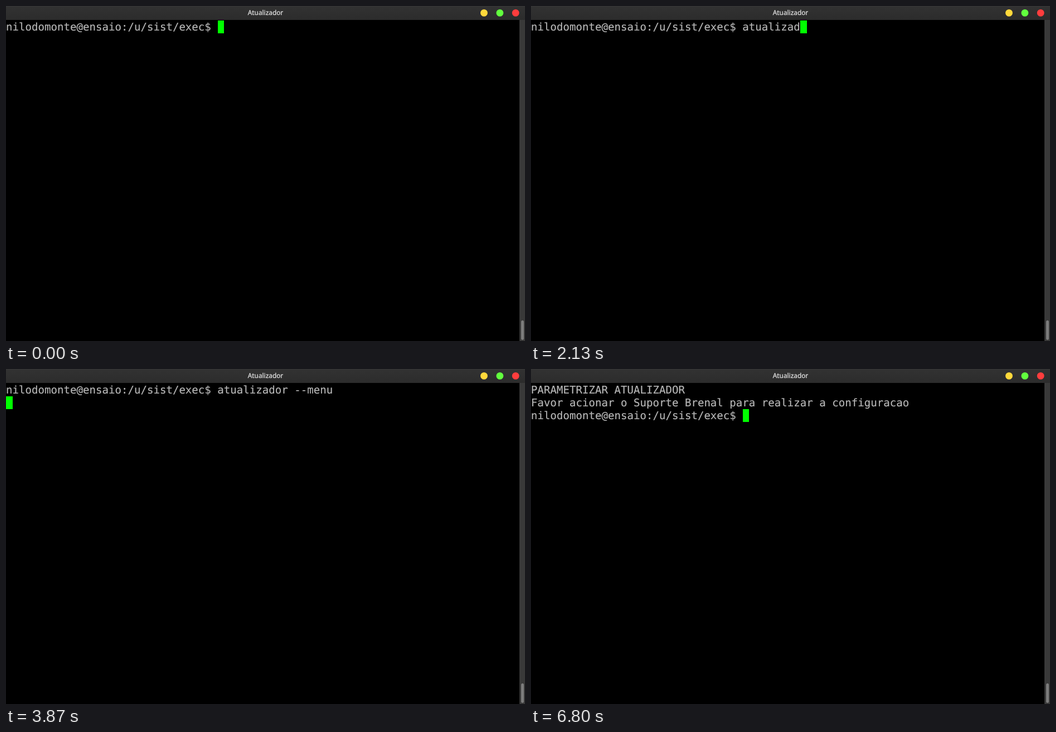
Recreate the animation shown at these times as an HTML page. Size 931 by 601 pixels, loop 8000 ms.

```html
<!DOCTYPE html>
<html lang="pt">
<head>
<meta charset="utf-8">
<title>Atualizador</title>
<style>
  html, body { margin: 0; width: 100%; height: 100%; overflow: hidden; background: #000; }
  #stage { position: relative; width: 931px; height: 601px; overflow: hidden; background: #000; }
  #stage > * { position: absolute; }
  #bar {
    left: 0; top: 0; width: 931px; height: 25px;
    background: linear-gradient(#383838 0 1px, #323232 1px, #2c2c2c);
    color: #dedede; text-align: center;
    font: 500 11.85px/25px "Noto Sans", "Open Sans", sans-serif;
    text-rendering: geometricPrecision; -webkit-text-stroke: 0.3px;
  }
  #buttons { left: 0; top: 0; }
  #track { left: 921px; top: 25px; width: 10px; height: 576px; background: #393939; }
  #thumb { left: 924px; top: 564px; width: 5px; height: 35px; border-radius: 3px; background: #7c7c7c; }
  #screen {
    left: 0; top: 26px; margin: 0; color: #b6b6b6; white-space: pre;
    font: 19.1015px/23px "DejaVu Sans Mono", monospace;
    text-rendering: geometricPrecision; font-variant-ligatures: none;
    -webkit-text-stroke: 0.2px;
  }
  #cursor { height: 23px; background: #0f0; }
</style>
</head>
<body>
<div id="stage">
  <div id="bar">Atualizador</div>
  <svg id="buttons" width="931" height="25">
    <circle cx="857.5" cy="12.4" r="6.4" fill="#ffd93b"/>
    <circle cx="885.9" cy="12.4" r="6.4" fill="#62ff3e"/>
    <circle cx="914.2" cy="12.4" r="6.4" fill="#ff3d3d"/>
  </svg>
  <div id="track"></div>
  <div id="thumb"></div>
  <div id="cursor"></div>
  <pre id="screen"></pre>
</div>
<script>
const LOOP = 8000, CELL = 11.5, ROW = 23, TOP = 26;
const prompt = "nilodomonte@ensaio:/u/sist/exec$ ";
const command = "atualizador --menu";
const keyTimes = [470, 800, 1130, 1400, 1530, 1670, 1870, 2000, 2130,
                  2270, 2330, 2470, 2600, 2730, 3000, 3130, 3270, 3470];

const left = ["1 - OBTER INFORMACOES DO SISTEMA", "2 - DETALHES DE VERSAO E RELEASES ATUAIS",
  "3 - ATUALIZAR", "4 - BACKUP EXECUTAVEIS", "5 - VISUALIZAR LOGS", "6 - CORRECOES"];
const right = [" 7 - OBTER UPDATE DO ATUALIZADOR", " 8 - CONFIGURAR ROTINA NO CRON",
  " 9 - PARAMETRIZACAO", "10 - MANUAL", "99 - SAIR", ""];
const menu = "\n".repeat(7) + " ".repeat(31) + "OPCOES DISPONIVEIS:\n\n" +
  left.map((item, i) => ("  " + item).padEnd(45) + right[i]).join("\n") +
  "\n\n  OPCAO: ";
const result = "PARAMETRIZAR ATUALIZADOR\n" +
  "Favor acionar o Suporte Brenal para realizar a configuracao\n" + prompt;

// Each step: start time and screen text; the cursor sits at the end of the text.
const steps = [
  [0, prompt],
  ...keyTimes.map((time, i) => [time, prompt + command.slice(0, i + 1)]),
  [3870, prompt + command + "\n"],
  [3930, menu],
  [6130, menu + "9"],
  [6800, result],
];

const screenEl = document.getElementById("screen");
const cursor = document.getElementById("cursor");
let shown = null;

function show(text) {
  const lines = text.split("\n");
  const col = lines[lines.length - 1].length;
  const x = Math.round(col * CELL);
  screenEl.textContent = text;
  cursor.style.left = x + "px";
  cursor.style.width = Math.round((col + 1) * CELL) - x + "px";
  cursor.style.top = TOP + (lines.length - 1) * ROW + "px";
}

function draw() {
  const t = performance.now() % LOOP;
  const text = steps.findLast(([time]) => time <= t)[1];
  if (text !== shown) show(shown = text);
  requestAnimationFrame(draw);
}
draw();
</script>
</body>
</html>
```
